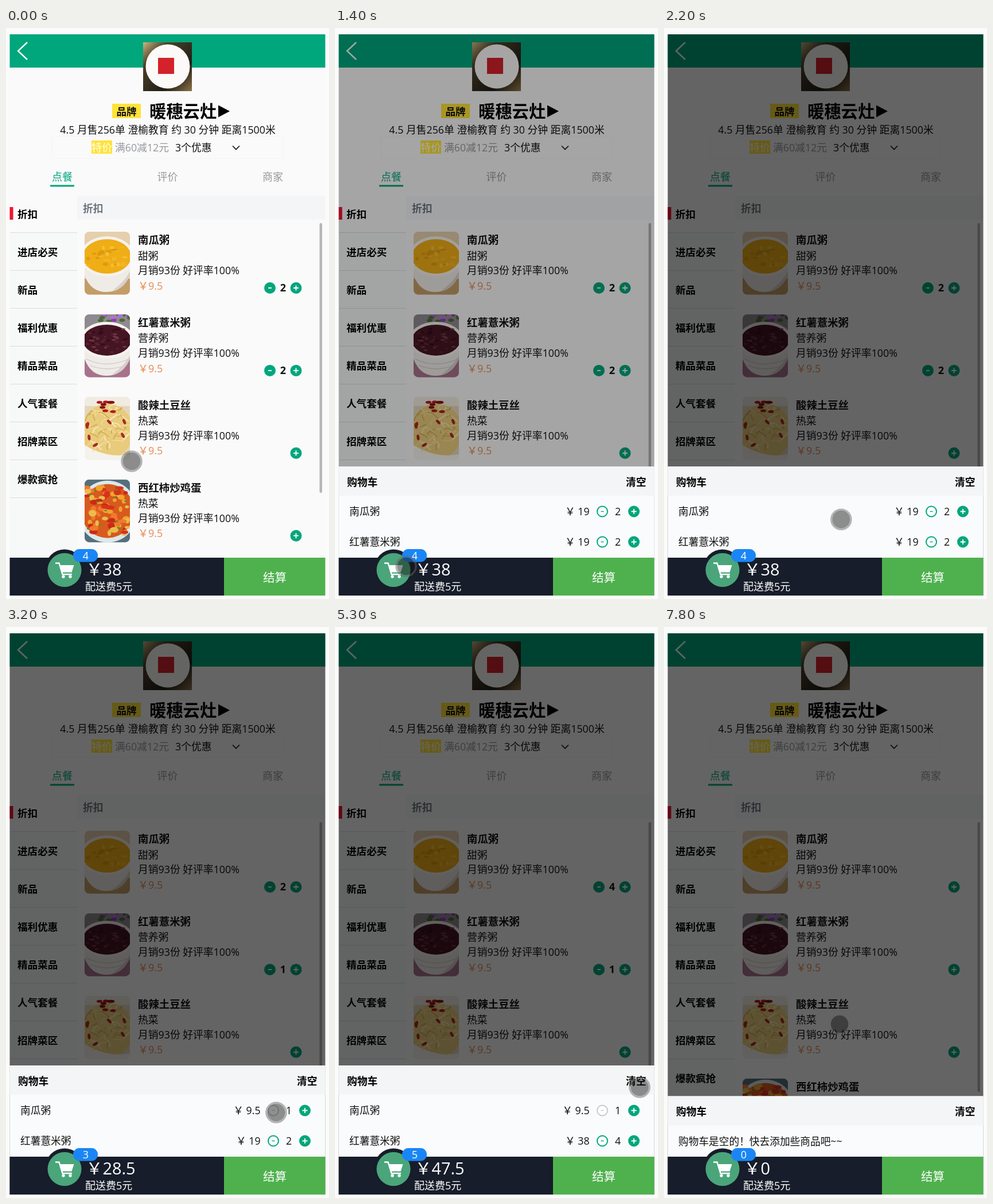
Recreate the animation shown at these times as an HTML page. Size 563 by 995 pixels, loop 8000 ms.

```html
<!DOCTYPE html>
<html lang="zh-CN">
<head>
<meta charset="utf-8">
<title>点餐购物车</title>
<style>
  html, body { margin: 0; width: 100%; height: 100%; overflow: hidden; background: #fbfbfb; }
  svg { display: block; width: 100%; height: 100%; }
  text { font-family: "Open Sans", "Noto Sans CJK SC", "Noto Sans CJK", sans-serif; white-space: pre; }
</style>
</head>
<body>
<svg id="stage" viewBox="0 0 563 995"></svg>
<script>
const GREEN = '#00a67c', GRAY = '#96989d', ORANGE = '#e58c54';
const LOOP = 8000, STEP = 100;
const LEFT = 6.5, WIDTH = 550;

// ---- drawing helpers ----
const rect = (x, y, w, h, fill, extra = '') =>
  `<rect x="${x}" y="${y}" width="${w}" height="${h}" fill="${fill}" ${extra}/>`;
const circle = (x, y, r, fill, extra = '') =>
  `<circle cx="${x}" cy="${y}" r="${r}" fill="${fill}" ${extra}/>`;
const ellipse = (x, y, rx, ry, fill, extra = '') =>
  `<ellipse cx="${x}" cy="${y}" rx="${rx}" ry="${ry}" fill="${fill}" ${extra}/>`;
const line = (d, stroke, width, extra = '') =>
  `<path d="${d}" fill="none" stroke="${stroke}" stroke-width="${width}" ${extra}/>`;

// y is the vertical middle of the glyphs
function text(str, x, y, { size = 17.8, fill = '#111', bold = false, anchor = 'start', id = '' } = {}) {
  return `<text x="${x}" y="${y + size * 0.37}" font-size="${size}" fill="${fill}"
    font-weight="${bold ? 700 : 400}" text-anchor="${anchor}" ${id && `id="${id}"`}>${str}</text>`;
}
const plus = (x, y) => circle(x, y, 10, GREEN) + line(`M${x - 4.5} ${y}h9M${x} ${y - 4.5}v9`, '#fff', 1.8);
const minus = (x, y) => circle(x, y, 10, GREEN) + line(`M${x - 3} ${y}h6`, '#fff', 1.8);

function randomizer(seed) {
  return () => (seed = (seed * 16807) % 2147483647) / 2147483647;
}
function scatter(seed, count, [x, y, w, h], draw) {
  const rnd = randomizer(seed);
  return Array.from({ length: count }, () => draw(x + rnd() * w, y + rnd() * h, rnd)).join('');
}
const pick = (list, rnd) => list[Math.floor(rnd() * list.length)];

// ---- dishes, each drawn in a 79 x 110 box ----
const bowl = (middle, height, depth, fill) =>
  `<path d="M-6 ${middle}Q-2 ${depth} 38 ${depth}Q80 ${depth} 86 ${middle}z" fill="#efece8"/>
   <path d="M48 ${depth - 2}Q80 ${depth - 6} 86 ${middle}L79 ${middle + 26}Q70 ${depth - 18} 48 ${depth - 2}z" fill="#d8d0ca"/>
   ${ellipse(39, middle, 47, height + 5, '#f5f2ee')}${ellipse(39, middle, 42, height, fill)}`;

function pumpkin() {
  return rect(0, 0, 79, 110, '#e6cfac') + rect(0, 82, 79, 28, '#c39d68') + bowl(43, 30, 105, '#efad16') +
    scatter(7, 26, [6, 22, 66, 40], (x, y, r) =>
      ellipse(x, y, 2 + r() * 5, 1 + r() * 3, pick(['#f6bf32', '#df9a0e', '#f2b524'], r)));
}
function redPorridge() {
  return rect(0, 0, 79, 110, '#8f8a91') + rect(0, 84, 79, 26, '#a8728c') +
    scatter(21, 14, [28, 0, 51, 14], (x, y, r) =>
      ellipse(x, y, 5, 3, pick(['#8a3fae', '#b36fd0', '#4d6b35'], r))) +
    bowl(45, 27, 107, '#451523') +
    scatter(5, 45, [5, 24, 68, 42], (x, y, r) =>
      ellipse(x, y, 2 + r() * 2, 1.5, pick(['#5c2232', '#300c18', '#6f3744'], r))) +
    line('M3 78Q38 95 77 78M9 89Q38 101 71 89', '#d5cbd0', 1.5);
}
function potato() {
  return rect(0, 0, 79, 110, '#e3d6bd') + rect(0, 0, 79, 16, '#f1ece2') +
    ellipse(40, 60, 45, 48, '#e8cb7c') + '<path d="M0 84Q40 108 79 100V110H0z" fill="#f5f2ec"/>' +
    scatter(12, 60, [0, 20, 79, 70], (x, y, r) =>
      line(`M${x} ${y}q${r() * 16 - 8} ${-r() * 12} ${r() * 40 - 20} ${r() * 24 - 12}`,
        pick(['#f8ebb9', '#d3ab4e', '#f3dc98'], r), 1.6)) +
    scatter(31, 8, [26, 8, 24, 20], (x, y, r) => ellipse(x, y, 5, 2.5, pick(['#b51a1e', '#821215'], r))) +
    scatter(47, 7, [4, 42, 70, 46], (x, y, r) =>
      ellipse(x, y, 5, 2.5, '#ad2a20', `transform="rotate(${r() * 160} ${x} ${y})"`));
}
function tomatoEgg() {
  return rect(0, 0, 79, 110, '#55707c') + ellipse(40, 56, 52, 54, '#dce8ea') + ellipse(40, 55, 46, 47, '#d85a1e') +
    scatter(9, 70, [2, 14, 74, 80], (x, y, r) =>
      ellipse(x, y, 3 + r() * 5, 2 + r() * 4, pick(['#d8321c', '#f0a42c', '#e9bd4c', '#c92a18', '#ef7a2c'], r))) +
    scatter(15, 12, [6, 18, 66, 70], (x, y) => ellipse(x, y, 2.5, 1.3, '#5e8a32'));
}

const dishes = [
  { name: '南瓜粥', kind: '甜粥', art: pumpkin },
  { name: '红薯薏米粥', kind: '营养粥', art: redPorridge },
  { name: '酸辣土豆丝', kind: '热菜', art: potato },
  { name: '西红柿炒鸡蛋', kind: '热菜', art: tomatoEgg },
];
const menu = ['折扣', '进店必买', '新品', '福利优惠', '精品菜品', '人气套餐', '招牌菜区', '爆款疯抢'];
const dishTop = i => 355 + i * 143.9;

// ---- scene ----
const backdrop = () =>
  rect(LEFT, 11, WIDTH, 978, '#fafafa') + rect(LEFT, 11, WIDTH, 58, GREEN) +
  rect(LEFT, 357, 117.5, 566, '#f7f8f8') + rect(124, 293, 432.5, 41, '#f3f5f7') +
  rect(80.5, 188.5, 402, 39, 'none', 'stroke="#000" stroke-opacity=".025"') +
  menu.map((_, i) => rect(7, 356 + i * 66, 117, 1, '#d9dce3')).join('');

const pictures = () =>
  rect(239, 25, 85, 85, 'url(#photo)') + circle(282, 67, 38.5, '#fbfaf8') + rect(265, 52, 28, 28, '#d3222a') +
  dishes.map((d, i) =>
    `<g transform="translate(137 ${dishTop(i)})" clip-path="url(#round)">${d.art()}</g>`).join('');

const dishText = (d, i) => {
  const y = dishTop(i);
  return text(d.name, 230, y + 14, { size: 18.4, bold: true }) + text(d.kind, 230, y + 42) +
    text('月销93份 好评率100%', 230, y + 67.5) + text('￥9.5', 230, y + 94, { size: 18, fill: ORANGE }) +
    `<g id="pageCount${i}">${minus(460, y + 98)}${text('', 483, y + 97.5,
      { size: 18, bold: true, anchor: 'middle', id: 'pageQty' + i })}</g>` + plus(505.5, y + 98);
};

const labels = () =>
  line('M37 25L21 40L37 55', '#f4fffb', 2.4) +
  rect(185, 132, 50, 25, '#ffe338') + text('品牌', 210, 145, { size: 17.6, bold: true, anchor: 'middle' }) +
  text('暖穗云灶', 250, 145, { size: 29.3, bold: true, fill: '#000' }) +
  '<path d="M370 134.5L390 145L370 155.500z" fill="#000"/>' +
  text('4.5 月售256单 澄榆教育 约 30 分钟 距离1500米', 282, 177, { anchor: 'middle' }) +
  rect(149, 196, 36, 23, '#ffe338') + text('特价', 149, 208, { size: 18, fill: '#fff' }) +
  text('满60减12元', 190, 208, { fill: GRAY }) + text('3个优惠', 295, 208) +
  line('M395 205.500L401 211.500L407 205.500', '#111', 1.7) +
  text('点餐', 98, 259, { size: 18, fill: GREEN, anchor: 'middle' }) + rect(77, 273.500, 42, 3, GREEN) +
  text('评价', 281.5, 259, { size: 18, fill: GRAY, anchor: 'middle' }) +
  text('商家', 465, 259, { size: 18, fill: GRAY, anchor: 'middle' }) +
  rect(LEFT, 312, 6, 22, '#f0142f') +
  menu.map((m, i) => text(m, 20, 324 + i * 66, { size: 17.6, bold: true, fill: '#000' })).join('') +
  text('折扣', 134, 314, { bold: true, fill: '#70757f' }) +
  dishes.map(dishText).join('') +
  rect(546.5, 340, 4.5, 470, '#b5b5b5', 'rx="2"');

const cartRow = (i, y) =>
  text(dishes[i].name, 25, y, { size: 17.7 }) +
  text('', 443.5, y, { size: 17.7, anchor: 'end', id: 'cost' + i }) +
  `<g id="less${i}" stroke="${GREEN}">${circle(466, y + 0.5, 9, '#fff', 'stroke-width="2"')}
   <path d="M463.500 ${y + 0.5}h5" stroke-width="1.4"/></g>` +
  text('', 493, y, { anchor: 'middle', id: 'qty' + i }) + plus(521, y + 0.5);

const panel = () =>
  `<g clip-path="url(#abovebar)"><g id="panel">` +
  rect(LEFT, 764, WIDTH, 225, '#fafbfc') + rect(LEFT, 764, WIDTH, 51, '#f4f5f6') +
  text('购物车', 21, 791, { size: 17.7, bold: true, fill: '#000' }) +
  text('清空', 507, 791, { size: 17.7, bold: true, fill: '#000' }) +
  `<g id="rows">${cartRow(0, 842)}${cartRow(1, 895)}</g>
   <g id="empty">${text('购物车是空的！快去添加些商品吧~~', 25, 842.5, { size: 17.7 })}</g></g></g>`;

const bar = () =>
  rect(LEFT, 923, 373.5, 66, '#171d2a') + rect(380, 923, 176.5, 66, '#4fb14e') +
  circle(102, 942, 33.5, '#171d2a') + circle(102, 944.5, 29.5, '#4aa57b') +
  line('M86 932.500h6.500l6 19.500H115', '#fff', 2.4) +
  '<path d="M94 936h24.500l-4 12.500H97.500z" fill="#fff"/>' +
  circle(100, 956, 2.7, '#fff') + circle(112, 956, 2.7, '#fff') +
  rect(117, 908, 43, 22.5, '#1a86f5', 'rx="11"') +
  text('', 139, 919, { size: 18, fill: '#fff', anchor: 'middle', id: 'badge' }) +
  text('', 139.5, 943, { size: 28.9, fill: '#fff', id: 'total' }) +
  text('配送费5元', 138, 973, { size: 18, fill: '#fff' }) +
  text('结算', 468.5, 957, { size: 20.5, fill: '#fff', anchor: 'middle' });

const pointer = () =>
  `<g id="pointer">${circle(0, 0, 17, 'none', 'stroke="#646464" stroke-opacity=".47" stroke-width="3.6"')}
   ${circle(0, 0, 15.3, '#151515', 'fill-opacity=".48"')}</g>`;

const stage = document.getElementById('stage');
stage.innerHTML = `<defs>
  <clipPath id="round"><rect width="79" height="109.500" rx="8"/></clipPath>
  <clipPath id="abovebar"><rect x="6" y="11" width="551" height="912"/></clipPath>
  <linearGradient id="photo" x2="1" y2="1"><stop offset="0" stop-color="#cdb581"/>
    <stop offset=".25" stop-color="#4c4029"/><stop offset=".7" stop-color="#211d17"/>
    <stop offset="1" stop-color="#8d7446"/></linearGradient></defs>
  ${backdrop()}${pictures()}${labels()}
  ${rect(LEFT, 11, WIDTH, 978, '#000', 'id="shade"')}
  ${panel()}${bar()}${pointer()}`;
const el = id => document.getElementById(id);

// ---- motion: [time, values...] ----
const pointerKeys = [
  [0, 219, 755], [200, 219, 755], [800, 124, 938], [1600, 124, 938], [2000, 192, 894], [2500, 484, 800],
  [2800, 471, 846], [3300, 471, 846], [3700, 526, 895], [4900, 526, 895], [5300, 531, 802], [6200, 531, 802],
  [6300, 531, 817], [6400, 531, 817], [6600, 534, 795], [6700, 534, 795], [6800, 531, 791], [7500, 531, 791],
  [7800, 306, 692],
];
const panelKeys = [[0, 159], [1100, 159], [1200, 136], [1300, 40], [1400, 0]];
const shadeKeys = [[0, 0], [1100, 0], [1200, 0.03], [1400, 0.34], [1600, 0.5], [1900, 0.6]];

// page: counters in the list; cart: counters in the panel
const states = [
  { at: 0, page: [2, 2], cart: [2, 2] },
  { at: 3200, page: [2, 1], cart: [1, 2] },
  { at: 4000, page: [3, 1], cart: [1, 3] },
  { at: 4500, page: [4, 1], cart: [1, 4] },
  { at: 6800, page: [0, 0], cart: [0, 0] },
];

function sample(keys, t) {
  const next = keys.findIndex(k => k[0] > t);
  if (next < 0) return keys[keys.length - 1].slice(1);
  const a = keys[next - 1], b = keys[next], p = (t - a[0]) / (b[0] - a[0]);
  return a.slice(1).map((v, i) => v + (b[i + 1] - v) * p);
}
const show = (id, visible) => el(id).setAttribute('visibility', visible ? 'visible' : 'hidden');

function render(time) {
  const t = Math.floor((time % LOOP) / STEP) * STEP;
  const { page, cart } = states.filter(s => s.at <= t).pop();
  const count = cart[0] + cart[1];

  dishes.forEach((_, i) => {
    show('pageCount' + i, page[i] > 0);
    el('pageQty' + i).textContent = page[i] || '';
  });
  cart.forEach((n, i) => {
    el('cost' + i).textContent = '￥ ' + n * 9.5;
    el('qty' + i).textContent = n;
    el('less' + i).setAttribute('stroke', n > 1 ? GREEN : '#c9c9c9');
  });
  show('rows', count > 0);
  show('empty', count === 0);
  el('badge').textContent = count;
  el('total').textContent = '￥' + count * 9.5;

  const [slide] = sample(panelKeys, t), [shade] = sample(shadeKeys, t), [x, y] = sample(pointerKeys, t);
  el('panel').setAttribute('transform', `translate(0 ${slide + (count ? 0 : 53.5)})`);
  el('shade').setAttribute('opacity', shade);
  el('pointer').setAttribute('transform', `translate(${x} ${y})`);
}

const start = performance.now();
(function frame() {
  render(performance.now() - start);
  requestAnimationFrame(frame);
})();
</script>
</body>
</html>
```
